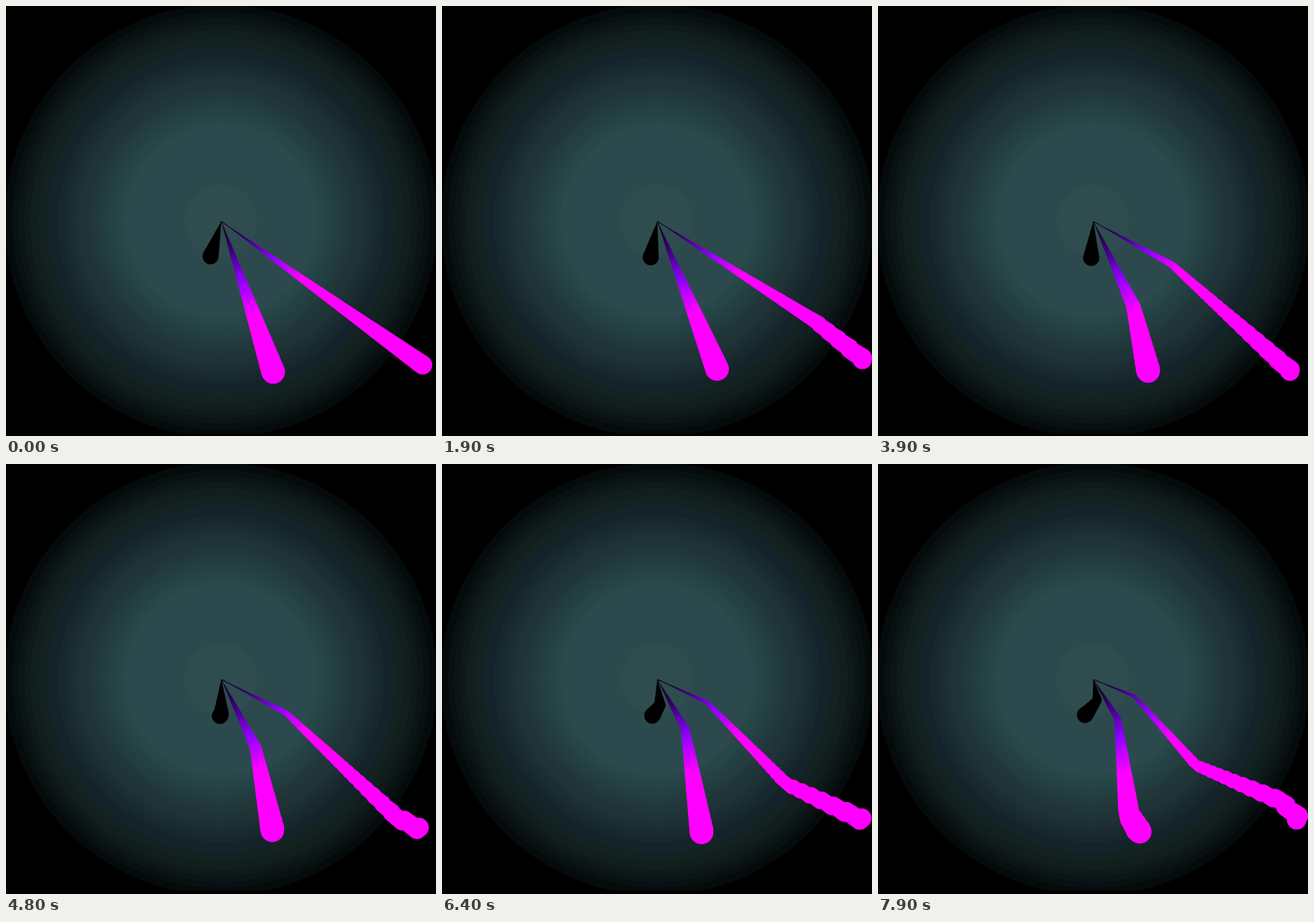
Recreate the animation shown at these times as an HTML page with a canvas. Size 640x640 px, loop 8000 ms.

```html
<!DOCTYPE html>
<html lang="en">
<head>
<meta charset="utf-8">
<title>Swaying hands</title>
<style>
  html, body { margin: 0; width: 100%; height: 100%; overflow: hidden; background: #000; }
  canvas { display: block; }
</style>
</head>
<body>
<canvas id="stage" width="640" height="640"></canvas>
<script>
const ctx = document.getElementById('stage').getContext('2d');
const STEP = 100, STEPS = 80, CENTER = 320.5, LIMIT = 15;

// Concentric discs, largest first: radius, colour
const rings = [
  [322, '#050a0b'], [311, '#081011'], [302, '#0b1516'], [293, '#0e191a'],
  [284, '#111e1e'], [272, '#132121'], [259, '#142329'], [243, '#16272d'],
  [235, '#182a2f'], [228, '#1b2d31'], [221, '#1c2f32'], [214, '#1f3236'],
  [206, '#203437'], [198, '#213639'], [190, '#22393c'], [183, '#233c3f'],
  [175, '#233f42'], [168, '#244245'], [160, '#254547'], [152, '#284749'],
  [144, '#2c4a4d'], [54, '#2f4c4f']
];

const glow = ctx.createRadialGradient(CENTER, CENTER, 0, CENTER, CENTER, 147);
[[0, '#000'], [.3, '#370073'], [.61, '#8700f0'], [.69, '#9f00ff'], [1, '#f0f']]
  .forEach(([at, color]) => glow.addColorStop(at, color));

// speed is the tip's sideways travel in px per step
const hands = [
  { angle: 107.1, length: 54.5, width: 12, speed: .336, fill: '#000' },
  { angle: 71, length: 237, width: 17.7, speed: .661, fill: glow },
  { angle: 35.5, length: 368, width: 14.3, speed: 1.073, fill: glow }
];

function disc(x, y, r) {
  ctx.moveTo(x + r, y);
  ctx.arc(x, y, r, 0, Math.PI * 2);
}

// Sideways offset after n steps, turning back once the limit is passed
function sway(n, speed) {
  const turn = Math.ceil(LIMIT / speed);
  const phase = (n + turn) % (4 * turn);
  return speed * (turn - Math.abs(phase - 2 * turn));
}

function drawHand(hand, n) {
  ctx.beginPath();
  for (let r = 1; r <= hand.length; r += .5) {
    const u = r / hand.length;
    const a = hand.angle * Math.PI / 180 - sway(n, hand.speed * u) / r;
    disc(CENTER + r * Math.cos(a), CENTER + r * Math.sin(a), Math.max(.6, hand.width * u));
  }
  ctx.fillStyle = hand.fill;
  ctx.fill();
}

function draw(n) {
  ctx.fillStyle = '#000';
  ctx.fillRect(0, 0, 640, 640);
  for (const [r, color] of rings) {
    ctx.beginPath();
    disc(320, 320, r);
    ctx.fillStyle = color;
    ctx.fill();
  }
  ctx.fillStyle = '#000';
  ctx.fillRect(0, 636, 640, 4);
  hands.forEach(hand => drawHand(hand, n));
}

const start = performance.now();
let shown = -1;
function tick() {
  const n = Math.floor((performance.now() - start) / STEP) % STEPS;
  if (n !== shown) draw(shown = n);
  requestAnimationFrame(tick);
}
tick();
</script>
</body>
</html>
```
